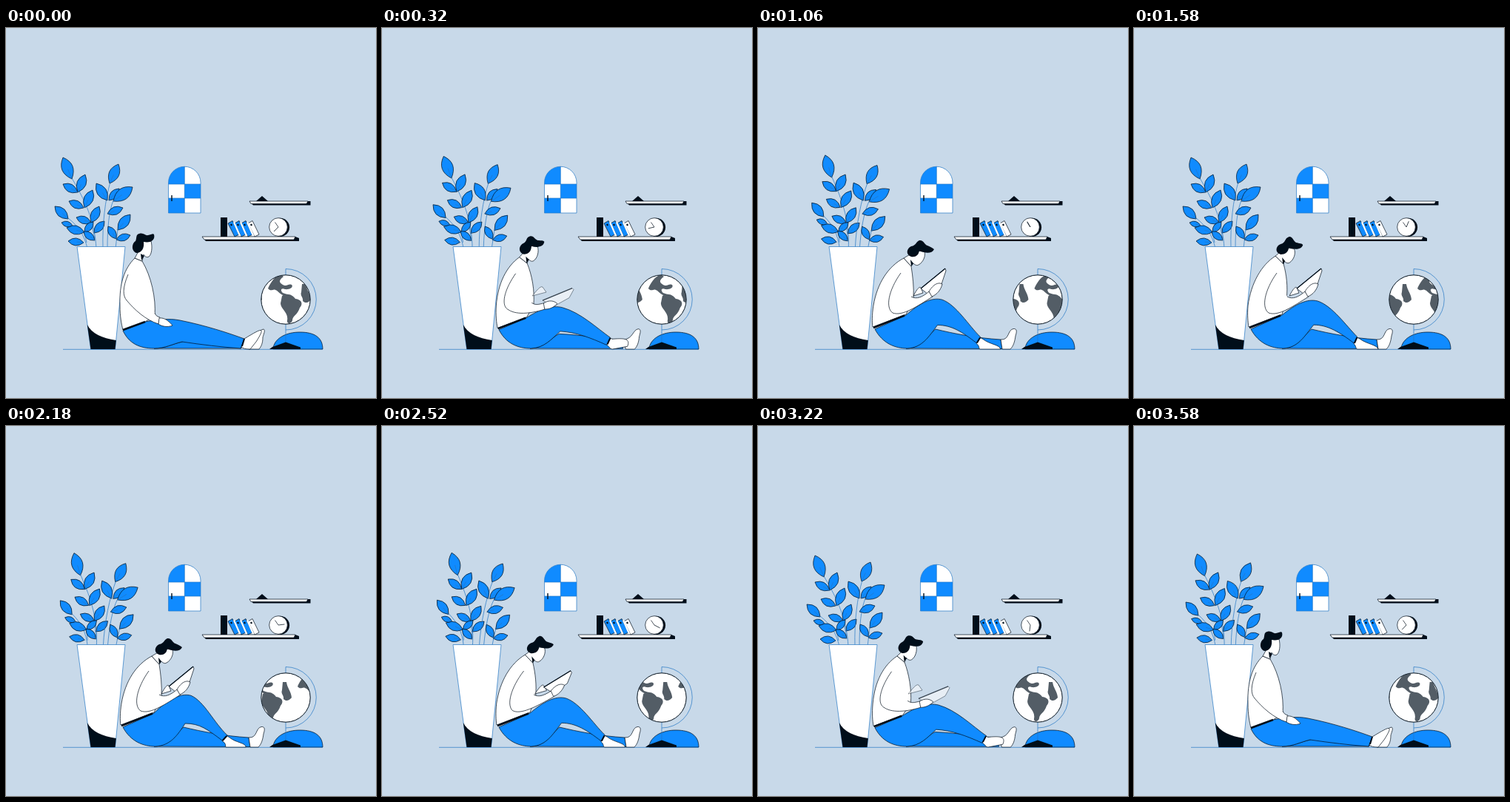
An HTML page for the animation above (3600 ms loop, 500x500 px).

```html
<!DOCTYPE html>
<html lang="en">
<head>
<meta charset="utf-8">
<style>
  html, body { margin: 0; width: 100%; height: 100%; overflow: hidden; background: #c8d9e9; }
  svg { display: block; width: 100%; height: 100%; }
  .b { fill: #108bff; } .w { fill: #fff; } .k { fill: #000e1a; }
  .ink { stroke: #000e1a; stroke-width: .7; stroke-linejoin: round; }
  .thin { stroke: #2577c4; stroke-width: .7; }
  .no { fill: none; }
</style>
</head>
<body>
<svg viewBox="0 0 500 500">
  <defs>
    <clipPath id="arch"><path d="M219.5 250V209a21.75 21.75 0 0 1 43.5 0V250Z"/></clipPath>
    <clipPath id="ball"><circle cx="378" cy="367" r="33"/></clipPath>
    <g id="land" fill="#535d66">
      <path d="M354 352C358 343 363 336 371 333L375 336C368 341 369 344 374 347C380 350 381 345 386 347C389 350 383 354 377 353C372 351 370 354 374 358L380 360L378 362C370 361 368 355 364 354C361 352 358 357 354 352Z"/>
      <path d="M373 362C380 357 388 361 391 366C399 367 402 372 397 378C394 388 387 389 387 395C386 400 379 401 380 395C382 384 371 380 371 372Z"/>
      <path d="M334 346L339 346C340 354 345 358 346 367C342 372 338 372 335 369C336 364 331 362 333 357Z"/>
    </g>
  </defs>

  <!-- window -->
  <g clip-path="url(#arch)">
    <path class="w" d="M219 186H264V251H219Z"/>
    <path class="b" d="M219 186H241.3V211H219ZM241.3 211H264V230H241.3ZM219 230H241.3V251H219Z"/>
  </g>
  <path class="no thin" d="M219.5 250V209a21.75 21.75 0 0 1 43.5 0V250ZM241.3 187V250M219.5 211H263M219.5 230H263"/>
  <path class="no ink" style="stroke-width:1.4" d="M224 226V234"/>

  <!-- shelves -->
  <path class="k" d="M338 234L346 227L354 234ZM329 234H411.5V239.5H334Z"/>
  <path class="w ink" d="M329 234H408L406 237.5H331Z"/>
  <path class="k" d="M290 256H299V282H290ZM265 282H391L396 284V288H270Z"/>
  <path class="w ink" d="M265 282H391L389 286H268Z"/>
  <g id="books"></g>
  <circle class="k" cx="370.5" cy="269.3" r="12.6"/>
  <circle class="w ink" cx="368" cy="269" r="12.3"/>
  <path class="no ink" d="M368 269L363.5 262.5"/>
  <path class="no ink" id="hand" d="M368 269V260.5"/>

  <!-- globe -->
  <path class="b ink" d="M361 432C364 418 380 411 397 411C418 411 428 419 428 434H361Z"/>
  <path class="no thin" d="M77 434.3H428"/>
  <path class="no thin" d="M378 425V325.5A41.2 41.2 0 0 1 378 408"/>
  <path class="k" d="M356 434L360 431L378 424.5L398 431.5V434Z"/>
  <circle class="w" cx="378" cy="367" r="33.2"/>
  <g clip-path="url(#ball)"><g id="map"><use href="#land"/><use href="#land" x="-66"/><use href="#land" x="66"/></g></g>
  <circle class="no ink" cx="378" cy="367" r="33.2" style="stroke-width:1"/>

  <!-- plant -->
  <g id="left"></g>
  <g id="right"></g>
  <path class="w thin" d="M96 295.5H161L147.5 434H114.5Z"/>
  <path class="k" d="M109.8 401C116 413 130 419 148.8 422L147.5 434H114.5Z"/>

  <g id="person"></g>
</svg>
<script>
const LOOP = 3600;
const $ = id => document.getElementById(id);

function add(parent, cls, d) {
  const el = document.createElementNS('http://www.w3.org/2000/svg', 'path');
  el.setAttribute('class', cls);
  if (d) el.setAttribute('d', d);
  return parent.appendChild(el);
}

// Interpolates two path strings that share the same commands.
function mix(a, b, k) {
  const num = /-?\d+(\.\d+)?/g, to = b.match(num);
  let i = 0;
  return a.replace(num, v => (+v + (to[i++] - v) * k).toFixed(2));
}

function ramp(t, from, to) {
  const k = Math.min(1, Math.max(0, (t - from) / (to - from)));
  return k * k * (3 - 2 * k);
}

const wave = (t, period) => (1 - Math.cos(2 * Math.PI * t / period)) / 2;

// A leaf from its base to its tip, plus a short vein.
function leaf(parent, [x, y, tx, ty]) {
  const dx = tx - x, dy = ty - y, w = .48;
  const side = s => `${x + dx * .52 - s * dy * w} ${y + dy * .52 + s * dx * w}`;
  add(parent, 'b ink', `M${x} ${y}Q${side(1)} ${tx} ${ty}Q${side(-1)} ${x} ${y}Z`);
  add(parent, 'no thin', `M${x} ${y}L${x + dx * .45} ${y + dy * .45}`);
}

add($('left'), 'no thin', 'M122 298C120 262 108 235 89 203M110 298C106 280 98 268 84 257M115 262L120 285M106 276L109 290');
[[89, 204, 77, 175], [97, 222, 107, 198], [97, 222, 77, 211], [106, 243, 117, 219],
 [105, 243, 85, 234], [84, 258, 66, 241], [115, 263, 126, 241], [115, 263, 95, 256],
 [106, 276, 82, 270], [90, 267, 75, 263], [106, 276, 118, 262], [105, 290, 84, 288],
 [119, 277, 133, 261], [120, 287, 105, 275]].forEach(p => leaf($('left'), p));

add($('right'), 'no thin', 'M131 298C130 265 134 232 141 208M137 298C137 270 139 248 145 233M148 298L151 272');
[[140, 210, 152, 184], [137, 233, 122, 210], [139, 233, 153, 217], [145, 234, 171, 215],
 [137, 251, 158, 243], [151, 273, 168, 252], [149, 285, 138, 268],
 [149, 286, 168, 280]].forEach(p => leaf($('right'), p));

['b', 'b', 'b', 'w'].forEach((cls, i) => {
  const x = 300 + i * 9;
  add($('books'), cls + ' ink', `M${x} 264L${x + 6} 260.5L${x + 15} 279L${x + 9} 282Z`);
  if (i) add($('books'), 'w', `M${x - 2} 263L${x} 262L${x + 8.5} 281H${x + 6}Z`);
  add($('books'), 'k', `M${x + 3} 265.5l2 -1l1 2l-2 1Z`);
});

// Each part: class, resting pose, reading pose, alternative reading pose, what drives the alternative.
const parts = [
  ['b ink',
    'M200 433C215 433 225 427 238 424C265 417 290 418 318 423L318 433Z',
    'M200 433C222 433 232 412 240 407C265 413 295 419 328 421L330 433.5Z'],
  ['w ink',
    'M325 421C338 416 342 408 348 407C351 408 348 414 347 418C347 426 345 430 342 434L328 434Z',
    'M328 421C340 422 337 408 345 406.5C350 406 350 410 348 416C347 424 345 430 341 434L330 434Z'],
  ['w ink',
    'M322 420L318 431C320 433 324 434 330 434L338 424C352 402 345 406 322 420Z',
    'M299 419L292 426C298 428 296 434 297 434L324 434C324 428 310 428 302 421Z',
    'M302 418L298 427C301 430 300 434 303 434L331 434C330 428 315 427 306 420Z', 'knee'],
  ['b ink',
    'M158 409C166 426 180 433 200 433C215 433 225 427 238 424C265 428 290 431 317 433L322 420C300 412 270 402 235 395C220 392 205 394 188 397Z',
    'M158 407C168 426 185 433 202 433C222 432 232 418 242 402C262 402 272 410 292 425L299 418C280 400 268 372 250 364C236 360 218 370 200 388Z',
    'M158 407C168 426 185 433 202 433C222 432 230 416 243 401C262 401 280 412 298 426L302 417C288 403 268 376 248 370C234 366 218 374 200 388Z', 'knee'],
  ['no ink sock', 'M322 420L319 430', 'M298 419L292.5 425', 'M302 418L299 426', 'knee'],
  ['w ink',
    'M174 311C160 325 153 345 154 375C154 390 156 400 158 408L188 397L201 389C203 365 196 335 184 315Z',
    'M191 308C172 320 158 345 154 375C153 388 154 398 155 404L200 387L206 366C208 350 206 333 202 319Z',
    'M197 311C176 322 161 345 156 375C154 388 154 398 155 404L200 387L210 366C211 350 209 335 207 322Z', 'nod'],
  ['no ink belt', 'M158 408L188 397', 'M156 405L198 388.5'],
  ['w ink book',
    'M203 362C208 356 214 348 217 350L222 357Z',
    'M203 362C208 356 214 348 217 350L222 357Z',
    'M210 362C213 356 218 348 220 351L223 358Z', 'lift'],
  ['w ink book',
    'M217 392L257 376L259 378L253 389L232 400Z',
    'M217 354L257 337L259 339L253 350L232 362Z',
    'M220 352L253 325L254 328L248 346L230 360Z', 'lift'],
  ['no ink book fold',
    'M217 392L257 376',
    'M217 354L257 337',
    'M220 352L253 325', 'lift'],
  ['w ink',
    'M165 333C157 352 158 362 163 368C174 381 188 394 206 400L208 391C204 390 202 388 201 385',
    'M190 331C172 352 164 375 170 384C178 391 200 384 229 368L226 360C216 364 210 367 203 363',
    'M193 331C176 355 172 378 182 385C195 390 215 376 236 363L231 356C222 364 214 367 207 363', 'lift'],
  ['w ink',
    'M207 392C214 391 220 396 225 402C218 405 210 403 206 400Z',
    'M225 360C233 353 240 352 244 355C240 362 234 367 228 368Z',
    'M231 356C237 346 244 343 249 346C247 354 242 360 235 363Z', 'lift'],
  ['w ink',
    'M183 288L196 288C198 296 197 306 193 309C190 311 187 308 186 306L184 315L174 311L180 300Z',
    'M203 297L216 298C219 304 216 313 210 317C207 319 204 316 203 315L202 319L191 308L198 302Z',
    'M212 301L225 302C227 308 223 317 217 320C214 322 211 319 210 318L207 322L197 311L207 305Z', 'nod'],
  ['k',
    'M182 305L187 308L183 314Z',
    'M200 310L204 315L201 319Z',
    'M206 313L210 318L207 322Z', 'nod'],
  ['k',
    'M176 304C168 300 171 290 175 288C177 284 175 279 180 278C186 276 188 281 192 280C196 279 199 277 200 279C202 286 196 291 186 289C187 297 184 304 176 304Z',
    'M198 306C189 303 192 294 198 292C205 290 203 284 209 282C214 281 215 288 219 290C223 291 227 291 228 293C226 299 218 300 209 297C208 303 204 306 198 306Z',
    'M207 309C199 306 201 298 207 295C214 294 213 289 218 287C224 286 225 293 229 294C233 296 236 297 238 299C235 305 227 305 218 301C217 307 213 310 207 309Z', 'nod']
].map(([cls, rest, read, alt, driver]) => ({ el: add($('person'), cls, rest), rest, read, alt, driver }));

const style = (cls, width) => document.querySelectorAll(cls).forEach(el => el.style.strokeWidth = width);
style('.sock', 2);
style('.belt', 2.6);
style('.fold', 1.3);
const bookParts = document.querySelectorAll('.book');

function draw(now) {
  const t = now % LOOP;
  const sway = wave(t, 1600);
  $('left').setAttribute('transform', `rotate(${8.2 * sway} 113 300)`);
  $('right').setAttribute('transform', `rotate(${5.8 * sway} 137 302)`);
  $('hand').setAttribute('transform', `rotate(${225 + 360 * t / LOOP} 368 269)`);
  $('map').setAttribute('transform', `translate(${66 * t / LOOP} 0)`);

  const sit = ramp(t, 40, 520) - ramp(t, 3020, 3500);
  const drive = {
    knee: 1 - wave(t, 1400),
    nod: 1 - wave(t - 1080, 1120),
    lift: ramp(t, 640, 1020) - ramp(t, 2260, 2800)
  };
  for (const { el, rest, read, alt, driver } of parts)
    el.setAttribute('d', mix(rest, alt ? mix(read, alt, drive[driver]) : read, sit));
  bookParts.forEach(el => el.style.opacity = ramp(sit, .4, .8));
  requestAnimationFrame(() => draw(performance.now() - start));
}

const start = performance.now();
draw(0);
</script>
</body>
</html>
```
